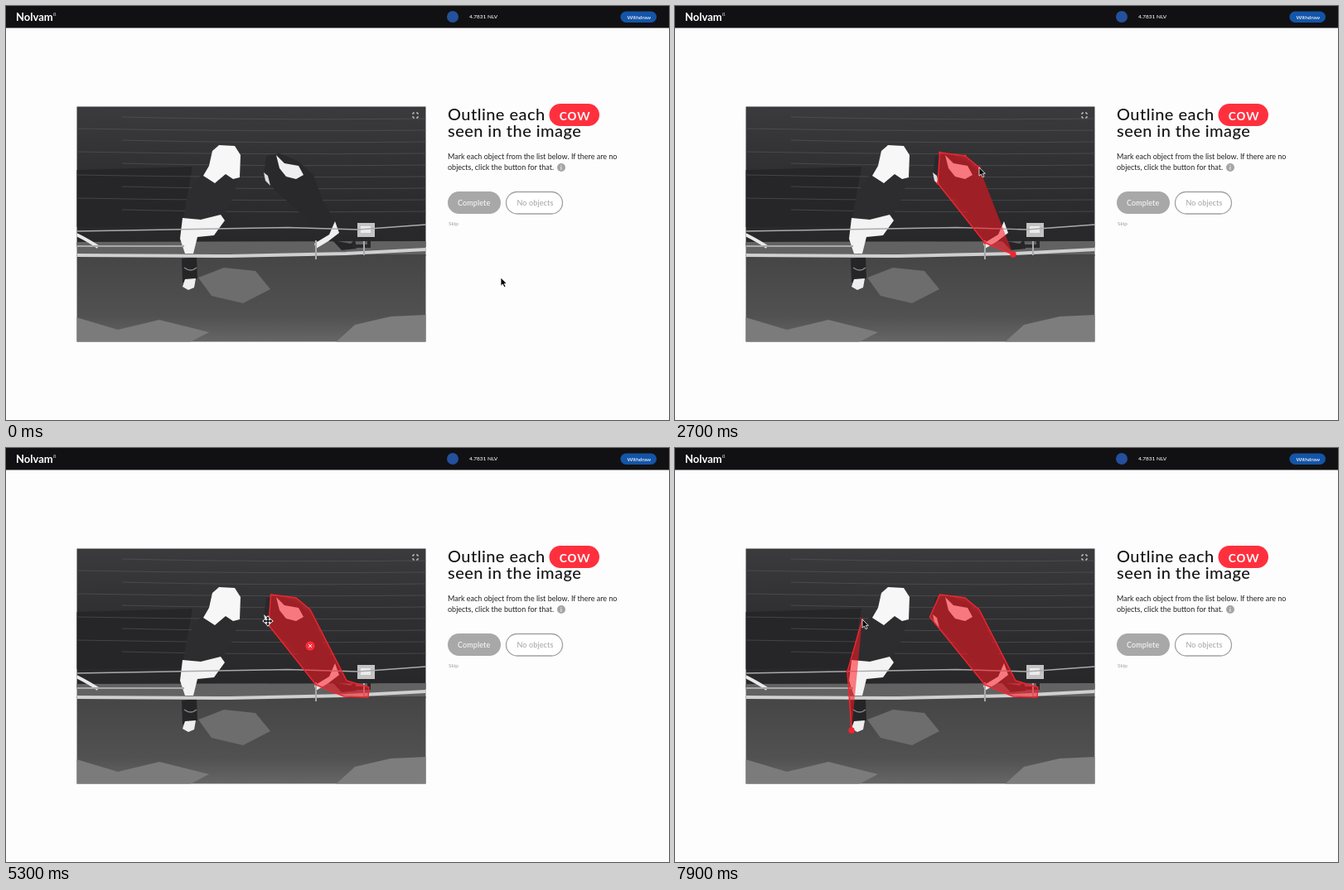
Recreate the animation shown at these times as an HTML page. Size 800x500 px, loop 8000 ms.

```html
<!DOCTYPE html>
<html lang="en">
<head>
<meta charset="utf-8">
<title>Outline task</title>
<style>
  html, body { margin: 0; width: 100%; height: 100%; overflow: hidden; background: #fefdfe; }
  svg { display: block; width: 800px; height: 500px; font-family: Lato, "Open Sans", sans-serif; }
  .title { font-size: 20px; font-weight: 500; letter-spacing: .45px; fill: #151517; }
  .body { font-size: 9px; fill: #222; }
  .button { font-size: 9px; letter-spacing: .13px; }
  .small { font-size: 6.5px; font-weight: 500; }
  .mask { fill: #ff1824; fill-opacity: .55; }
  .line { fill: none; stroke: #f2252f; stroke-width: 1.4; stroke-linejoin: round; }
</style>
</head>
<body>
<svg viewBox="0 0 800 500">
  <defs>
    <clipPath id="frame"><rect x="85.5" y="121.5" width="421" height="284"/></clipPath>
    <linearGradient id="floor" x2="0" y2="1">
      <stop offset="0" stop-color="#3b3b3d"/>
      <stop offset=".45" stop-color="#303032"/>
      <stop offset="1" stop-color="#272729"/>
    </linearGradient>
    <linearGradient id="ground" x2="0" y2="1">
      <stop offset="0" stop-color="#454546"/>
      <stop offset=".7" stop-color="#515152"/>
      <stop offset="1" stop-color="#666"/>
    </linearGradient>
  </defs>

  <rect width="800" height="26.5" fill="#111113"/>
  <text x="12" y="17.5" font-size="13" font-weight="700" fill="#fff">Nolvam</text>
  <text x="57" y="12" font-size="6" fill="#ddd">ß</text>
  <circle cx="539" cy="13" r="7" fill="#24509c"/>
  <text class="small" x="559" y="15.3" fill="#fff">4.7831 NLV</text>
  <rect x="741.5" y="6.5" width="43.5" height="13.5" rx="6.75" fill="#1455a8"/>
  <text class="small" x="749.5" y="15.7" fill="#fff">Withdraw</text>

  <g clip-path="url(#frame)">
    <rect x="85" y="121" width="422" height="170" fill="url(#floor)"/>
    <path d="M85 198L225 194 212 266 85 267Z" fill="#262628"/>
    <g id="furrows" fill="none" stroke="#59595b" stroke-width=".6"/>
    <path d="M85 285L507 284V302H85Z" fill="#626263"/>
    <path d="M85 300H507V406H85Z" fill="url(#ground)"/>
    <path d="M232 328L263 316 301 320 319 342 286 359 248 350Z" fill="#6d6d6e"/>
    <path d="M85 376L135 391 185 379 245 394 222 406H85Z" fill="#7b7b7c"/>
    <path d="M398 406L421 385 464 375 507 373V406Z" fill="#7d7d7e"/>

    <!-- left animal -->
    <path d="M241 198C233 206 220 220 216 243L214 259 255 257C271 247 277 224 280 205L264 192Z" fill="#2d2d2f"/>
    <path d="M249 175L257 168 276 169 283 180 282 207 274 209 265 203 252 214 238 205 245 193Z" fill="#f7f7f7"/>
    <path d="M213 256L235 258 259 252 264 259 251 277 231 279 226 299H216L210 281Z" fill="#f3f3f3"/>
    <path d="M212 305L230 303 231 329 213 334Z" fill="#252527"/>
    <path d="M215 316Q223 322 230 316" fill="none" stroke="#888" stroke-width="1.5"/>
    <path d="M216 330L229 329 227 340 220 343 213 339Z" fill="#eee"/>

    <!-- right animal -->
    <path d="M314 181L330 178 352 187 371 204 382 235 400 265 390 276 373 270 350 245 324 222 311 204Z" fill="#29292b"/>
    <path d="M326 180L336 190 353 193 359 204 350 209 338 206 330 196Z" fill="#eee"/>
    <path d="M311 201L316 205 319 217 313 211Z" fill="#ddd"/>
    <path d="M397 260L402 274 389 284 374 293 372 287 390 276Z" fill="#eee"/>
    <path d="M394 283L416 287 421 282 423 293 405 295Z" fill="#252527"/>
    <path d="M418 290H438V281" fill="none" stroke="#29292b" stroke-width="4"/>

    <rect x="424" y="262" width="21" height="17" fill="#c3c3c3"/>
    <path d="M428 266H440V274H428Z" fill="#ececec"/>
    <path d="M85 272L340 267.5 425 270 507 264" fill="none" stroke="#aaa" stroke-width="1.4"/>
    <path d="M85 276Q101 284 111 291" fill="none" stroke="#e8e8e8" stroke-width="4"/>
    <path d="M85 301L270 302 410 299 507 294" fill="none" stroke="#d0d0d0" stroke-width="4"/>
    <path d="M85 290L215 290M374 283V306M432 284V301" fill="none" stroke="#a9a9a9" stroke-width="2"/>
  </g>
  <path d="M491 131V129H493M495 129H497V131M497 133V135H495M493 135H491V133" fill="none" stroke="#ddd"/>

  <rect x="655.5" y="118" width="60.5" height="27" rx="13.5" fill="#ff303e"/>
  <text class="title" x="533" y="137.5">Outline each</text>
  <text class="title" x="667.5" y="137.5" style="fill:#fff">cow</text>
  <text class="title" x="533" y="157.5">seen in the image</text>
  <text class="body" x="533" y="184.5">Mark each object from the list below. If there are no</text>
  <text class="body" x="533" y="198">objects, click the button for that.</text>
  <circle cx="670" cy="195" r="5" fill="#a5a5a5"/>
  <text x="669.1" y="197.6" font-size="7" font-weight="700" fill="#fff">i</text>
  <rect x="533" y="224" width="64" height="27" rx="13.5" fill="#a8a8a9"/>
  <text class="button" x="545" y="241" fill="#fff">Complete</text>
  <rect x="603.5" y="224.5" width="68" height="26.5" rx="13.25" fill="#fff" stroke="#a2a2a3" stroke-width="1.3"/>
  <text class="button" x="616.5" y="241" fill="#a2a2a3">No objects</text>
  <text x="534" y="265" font-size="6.5" fill="#a0a0a0">Skip</text>

  <g id="shapes"></g>
  <g id="remove">
    <circle cx="367" cy="239" r="5.5" fill="#fb2f3c"/>
    <path d="M365 237L369 241M369 237L365 241" stroke="#fff" stroke-width=".9"/>
  </g>
  <path id="arrow" d="M0 0V10.2L2.4 8 4.1 11.8 6 11 4.3 7.3H7.4Z" fill="#080808" stroke="#fff" stroke-width=".8"/>
  <path id="mover" d="M0-5.5L2-3H.7V-.7H3V-2L5.5 0 3 2V.7H.7V3H2L0 5.5-2 3H-.7V.7H-3V2L-5.5 0-3-2V-.7H-.7V-3H-2Z"
        fill="#080808" stroke="#fff" stroke-width="1.6" paint-order="stroke"/>
</svg>
<script>
  const LOOP = 8000, STEP = 100;
  const $ = id => document.getElementById(id);

  // pointer stops: time, x, y
  const stops = [
    [0, 597, 328], [100, 597, 328], [300, 570, 342], [700, 408, 300],
    [900, 374, 286], [1000, 374, 286], [1400, 317, 214], [1500, 317, 214],
    [1800, 319.5, 177], [2000, 319.5, 177], [2300, 350, 181], [2400, 350, 181],
    [2700, 367, 195], [2800, 367, 195], [3300, 411, 281], [3600, 438, 289],
    [3700, 438, 289], [4000, 439, 300], [4100, 437, 301], [4400, 408, 300],
    [4600, 408, 300], [5200, 316, 209], [5300, 316, 209], [5700, 307.5, 204],
    [5800, 307.5, 204], [6300, 213, 341], [6400, 213, 341], [7000, 211, 294],
    [7200, 208, 270], [7300, 208, 270], [7900, 226, 207], [8000, 226, 207]
  ];
  // click times of each outline and when it closes
  const outlines = [
    { clicks: [700, 1000, 1400, 1900, 2300, 2700, 3300, 3600, 4100], close: 4500 },
    { clicks: [6400, 7200], close: Infinity }
  ];
  const DRAG = { from: 5300, to: 5700, vertex: 2 };
  const HOVER = [4600, 5800];

  function pointer(t) {
    const i = Math.max(1, stops.findIndex(s => s[0] >= t));
    const [t0, x0, y0] = stops[i - 1], [t1, x1, y1] = stops[i];
    const k = (t - t0) / (t1 - t0), e = k * k * (3 - 2 * k);
    return [x0 + (x1 - x0) * e, y0 + (y1 - y0) * e];
  }

  function drag(points, t) {
    if (t <= DRAG.from) return;
    const [x, y] = pointer(Math.min(t, DRAG.to));
    const k = Math.min(1, (t - DRAG.from) / (DRAG.to - DRAG.from));
    points[DRAG.vertex] = [x + 1 - k, y + 5 * (1 - k)];
  }

  const dot = ([x, y], r) => `<circle cx="${x}" cy="${y}" r="${r}" fill="#f2252f"/>`;

  function outline({ clicks, close }, t) {
    if (t < clicks[0]) return "";
    const points = clicks.filter(c => c <= t).map(pointer);
    const closed = t >= close;
    if (closed) drag(points, t); else points.push(pointer(t));
    const list = points.join(" ");
    const mask = `<polygon class="mask" points="${list}"/>`;
    if (closed) return mask + `<polygon class="line" points="${list}"/>`;
    return mask + `<polyline class="line" points="${list}"/>` +
      points.map((p, i) => dot(p, i ? 1.6 : 3.7)).join("");
  }

  function draw(now) {
    const t = Math.floor(now % LOOP / STEP) * STEP;
    const at = `translate(${pointer(t)})`;
    const hover = t >= HOVER[0] && t < HOVER[1];
    $("shapes").innerHTML = outlines.map(o => outline(o, t)).join("");
    $("remove").style.display = hover ? "" : "none";
    $("mover").style.display = hover ? "" : "none";
    $("arrow").style.display = hover ? "none" : "";
    $("arrow").setAttribute("transform", at);
    $("mover").setAttribute("transform", at);
  }

  $("furrows").innerHTML = Array.from({ length: 9 }, (_, i) => {
    const y = 134 + i * 14;
    return `<path d="M${i % 2 ? 85 : 140} ${y}Q300 ${y + 4} 507 ${y + 2}"/>`;
  }).join("");

  const start = performance.now();
  function tick() {
    draw(performance.now() - start);
    requestAnimationFrame(tick);
  }
  tick();
</script>
</body>
</html>
```
